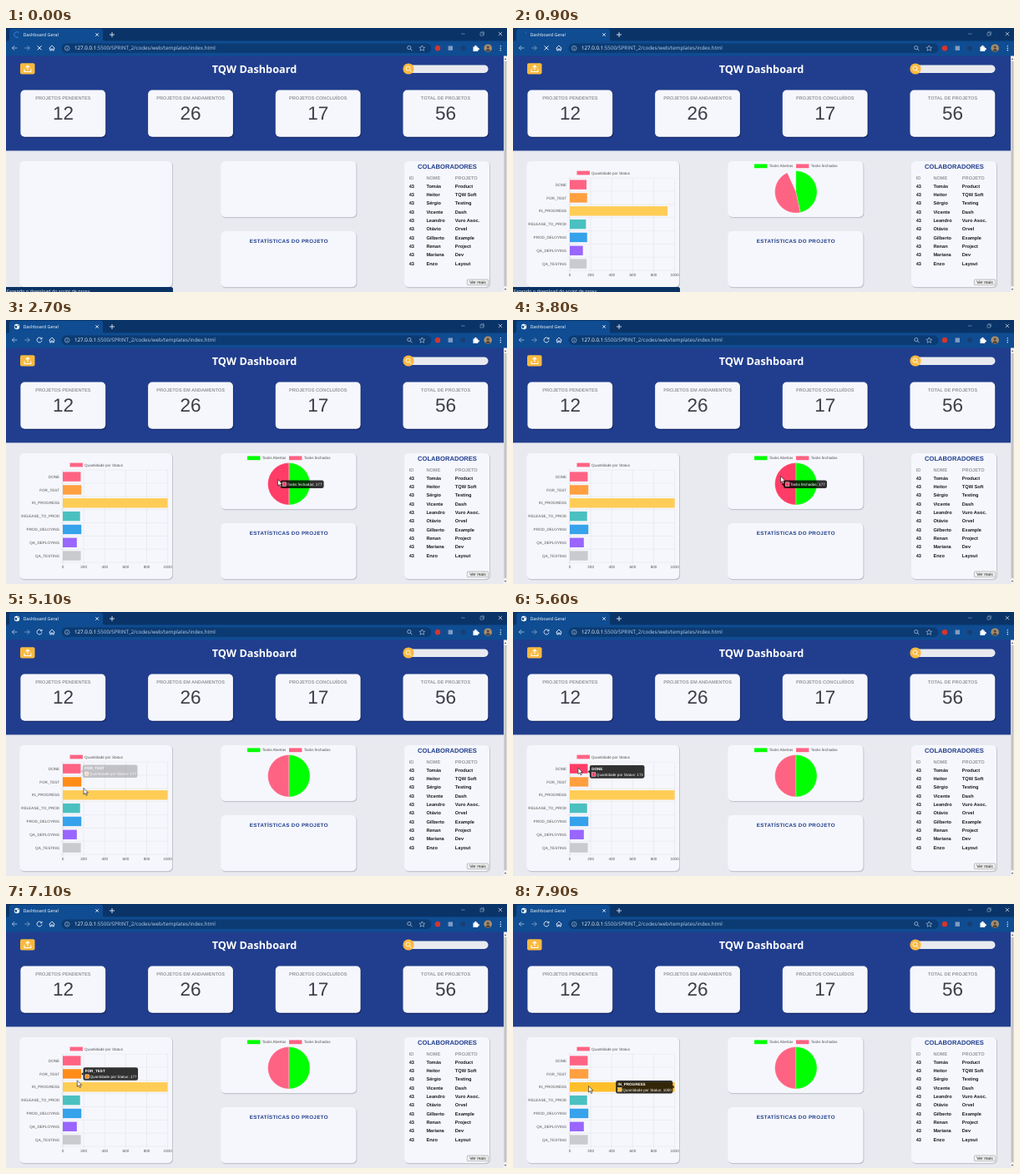
Recreate the animation shown at these times as an HTML page. Size 600 by 317 pixels, loop 8000 ms.

```html
<!DOCTYPE html>
<html lang="pt">
<head>
<meta charset="utf-8">
<title>Dashboard Geral</title>
<style>
html, body { margin: 0; width: 100%; height: 100%; overflow: hidden; background: #e9eaf0; }
svg { display: block; width: 100%; height: 100%; }
text { font-family: "Liberation Sans", Arial, sans-serif; text-rendering: geometricPrecision; white-space: pre; }
.ui { font-family: "Open Sans", sans-serif; }
.b { font-weight: bold; }
.m { text-anchor: middle; }
.e { text-anchor: end; }
</style>
</head>
<body>
<svg viewBox="0 0 600 317"><g id="page"></g><g id="charts"></g><g id="chrome"></g><g id="live"></g></svg>
<script>
const LOOP = 8000, CHART_START = 410, LOADED = 1400;
const TOOLBAR = '#0f4c92', NAVY = '#0a3263';
const $ = id => document.getElementById(id);

const text = (x, y, size, fill, str, cls = '', extra = '') =>
  `<text x="${x}" y="${y}" font-size="${size}" fill="${fill}" class="${cls}" ${extra}>${str}</text>`;
const rect = (x, y, w, h, fill, r = 0, extra = '') =>
  `<rect x="${x}" y="${y}" width="${w}" height="${h}" rx="${r}" fill="${fill}" ${extra}/>`;
const circle = (x, y, r, fill, extra = '') => `<circle cx="${x}" cy="${y}" r="${r}" fill="${fill}" ${extra}/>`;
const line = (d, stroke = '#fff', w = 0.8, extra = '') =>
  `<path d="${d}" fill="none" stroke="${stroke}" stroke-width="${w}" ${extra}/>`;
const card = (x, y, w, h, shade) =>
  rect(x + 0.6, y + 0.7, w + 0.4, h + 0.5, shade, 5) + rect(x, y, w, h, '#f6f7fc', 5);

// ---------- static page ----------
function page() {
  const blue = '#213e8e', grey = '#96979d', ink = '#1c1c1e';
  let s = rect(0, 33, 600, 284, '#e9eaf0') + rect(0, 33, 596, 114.4, blue);
  s += rect(17, 42.3, 17.5, 13.3, '#f9b940', 2);
  s += line('M22 49.5V52.5H29.8V49.5M25.9 50.5V45.3M23.6 47.4L25.9 45L28.2 47.4', '#fff', 1.1);
  s += text(297.5, 53.6, 12.7, '#fff', 'TQW Dashboard', 'ui b m');
  s += rect(476, 44.4, 101.5, 9.6, '#e9eaf0', 4.8) + circle(482, 49, 6.6, '#f9b940');
  s += circle(481.5, 48.5, 2.5, 'none', 'stroke="#fff" stroke-width=".9"') + line('M483.3 50.4L485.6 52.7', '#fff', 1);

  [['PENDENTES', 12], ['EM ANDAMENTOS', 26], ['CONCLUÍDOS', 17], [, 56]].forEach(([name, n], i) => {
    const x = 17.4 + i * 152.7;
    s += card(x, 74.6, 101.8, 56.2, '#14296a');
    s += text(x + 51, 86, 5.6, grey, name ? 'PROJETOS ' + name : 'TOTAL DE PROJETOS', 'b m');
    s += text(x + 51, 110, 22.5, '#3d3e46', n, 'm');
  });

  const shade = '#c3c4cc';
  s += card(16.4, 160, 182.6, 151, shade) + card(257.4, 160, 162, 67, shade);
  s += card(257.4, 244, 162, 67, shade) + card(477, 160, 102, 151, shade);
  s += text(338.8, 258, 6.2, blue, 'ESTATÍSTICAS DO PROJETO', 'b m', 'letter-spacing=".35"');

  s += text(528.5, 168.5, 7.6, blue, 'COLABORADORES', 'b m');
  const row = (y, fill, cells) => cells.forEach((c, i) => s += text([482.7, 503.4, 537.8][i], y, 5.65, fill, c, 'b'));
  row(181.7, grey, ['ID', 'NOME', 'PROJETO']);
  ['Tomás|Product', 'Heitor|TQW Soft', 'Sérgio|Testing', 'Vicente|Dash', 'Leandro|Vuro Asoc.', 'Otávio|Orvel',
   'Gilberto|Example', 'Renan|Project', 'Mariana|Dev', 'Enzo|Layout']
    .forEach((r, i) => row(191.6 + i * 10.36, ink, ['43', ...r.split('|')]));
  s += rect(552.3, 302, 25.4, 6.6, '#efefef', 1, 'stroke="#8a8a8a" stroke-width=".5"');
  s += text(565, 307, 5, '#111', 'Ver mais', 'm');

  s += rect(596, 33, 4, 284, '#f1f1f1') + rect(596.4, 40, 3.2, 270, '#c4c4c4');
  s += '<path d="M596.8 38l1.2-1.8 1.2 1.8zM596.8 313l1.2 1.8 1.2-1.8z" fill="#555"/>';
  return s;
}

// ---------- browser frame ----------
function chrome() {
  const pale = '#bcd0e8', dim = '#8fa9c8';
  let s = rect(0, 0, 600, 17, '#0a3468') + rect(0, 15.5, 600, 18, TOOLBAR);
  s += `<path d="M1 16Q4 16 4 13V4Q4 1 7 1H113Q116 1 116 4V13Q116 16 119 16Z" fill="${TOOLBAR}"/>`;
  s += text(20.4, 10, 5.4, '#fff', 'Dashboard Geral', 'ui');
  s += line('M107.3 6.2l3.6 3.6m0-3.6l-3.6 3.6M124 8h6m-3-3v6');
  s += line('M545 7h4.6M568 5.8h3.4v3.4h-3.4zM569 5.6V4.8H572.4V8.2H571.6', dim, 0.6);
  s += line('M589.8 4.8l4.4 4.4m0-4.4l-4.4 4.4', '#fff', 0.6);
  s += line('M13.3 24H7.3m2.8-2.8L7.3 24l2.8 2.8', pale);
  s += line('M22.3 24h6m-2.8-2.8L28.3 24l-2.8 2.8', dim);
  s += line('M51.6 24.4L55 21l3.4 3.4M52.7 23.6V27H54.2V25H55.8V27H57.3V23.6');
  s += rect(66.5, 18.5, 443, 11.6, '#0c3b73', 5.8);
  s += circle(73.2, 24.3, 2.8, 'none', `stroke="${pale}" stroke-width=".6"`) + line('M73.2 23.8v2.1m0-3.4v.7', pale, 0.7);
  s += text(82, 26.4, 6.2, '#fff',
    `127.0.0.1<tspan fill="${pale}">:5500/SPRINT_2/codes/web/templates/index.html</tspan>`, 'ui');
  s += circle(482.8, 23.6, 2.1, 'none', `stroke="${pale}" stroke-width=".7"`) + line('M484.4 25.2l2 2', pale);
  s += line('M498.3 20.9l1 2.2 2.4.2-1.8 1.6.6 2.4-2.2-1.3-2.2 1.3.6-2.4-1.8-1.6 2.4-.2z', pale, 0.6);
  s += circle(517, 24.2, 3.2, '#d9342b') + rect(529.6, 21.5, 5.4, 5.4, '#7f9cc0') + circle(547.2, 24.2, 2.8, '#1b3d6e');
  s += '<path d="M559.5 22.5h1.8a1.2 1.2 0 1 1 2.2 0h1.7v1.7a1.2 1.2 0 1 1 0 2.1v1.6h-5.7z" fill="#fff"/>';
  s += circle(577.2, 24.2, 4.8, '#a98c68') + circle(577.2, 23, 1.6, '#4e4a48')
    + '<path d="M574.1 27.4q3.1-4.6 6.2 0q-3.1 2.4-6.2 0z" fill="#4e4a48"/>';
  [21.6, 24.2, 26.8].forEach(y => s += circle(592.3, y, 0.7, '#fff'));
  return s;
}

// ---------- charts ----------
const PINK = '#ff6384', PINK_HOT = '#ff3d67';
const bars = [
  ['DONE', 171, PINK, PINK_HOT], ['FOR_TEST', 177, '#ff9f40', '#ff8c19'], ['IN_PROGRESS', 1000, '#ffcd56', '#ffbf2b'],
  ['RELEASE_TO_PROD', 165, '#4bc0c0'], ['PROD_DELOYING', 177, '#36a2eb'],
  ['QA_DEPLOYING', 134, '#9966ff'], ['QA_TESTING', 172, '#c9cbcf']
];
const slices = [['Tasks Abertas', 176, '#00ff00', '#00e000'], ['Tasks fechadas', 177, PINK, PINK_HOT]];
const X0 = 68, Y0 = 180.2, STEP = 15.83, SPAN = 125.6;
const PIE_X = 338.8, PIE_Y = 196.8, PIE_R = 25.2;
const rowY = i => Y0 + STEP * (i + 0.5);
const clamp = v => Math.min(1, Math.max(0, v));
const easeOut = v => 1 - (1 - clamp(v)) ** 4;
const mix = (a, b, v) => a + (b - a) * v;

function axes() {
  let s = rect(76.5, 171.6, 15.4, 4.8, PINK) + text(94, 175.6, 4.6, '#555', 'Quantidade por Status');
  for (let i = 0; i <= 5; i++) {
    const x = X0 + i * SPAN / 5;
    s += line(`M${x} ${Y0}v113`, i ? '#e0e1e6' : '#c9cad0', 0.5) + text(x, 298.2, 4.6, '#555', i * 200, 'm');
  }
  for (let i = 0; i <= 7; i++) s += line(`M${X0 - 3} ${Y0 + i * STEP}H${X0 + SPAN}`, '#e0e1e6', 0.5);
  bars.forEach((b, i) => s += text(64.2, rowY(i) + 1.6, 4.6, '#555', b[0], 'e'));
  slices.forEach((p, i) => s += rect(289 + i * 50, 163.4, 15.4, 4.8, p[2]) + text(306.8 + i * 50, 167.4, 4.6, '#555', p[0]));
  return s;
}

function sector(a, b, fill) {
  const p = t => `${PIE_X + PIE_R * Math.sin(t)} ${PIE_Y - PIE_R * Math.cos(t)}`;
  return `<path d="M${PIE_X} ${PIE_Y}L${p(a)}A${PIE_R} ${PIE_R} 0 ${b - a > Math.PI ? 1 : 0} 1 ${p(b)}Z"
    fill="${fill}" stroke="#fff" stroke-width=".25"/>`;
}

// Hover changes: [time, index], null when the pointer leaves
const barHover = [[4720, 0], [4900, null], [5080, 1], [5480, 0], [5800, null], [6080, 0], [6620, 1], [7180, 2]];
const pieHover = [[1850, 1], [2900, 0], [3650, 1], [3950, null]];
const hovered = (events, t) => (events.filter(e => e[0] <= t).pop() || [0, null])[1];

function barTip(i) {
  const [title, n, col, hot] = bars[i], right = i === 2, w = right ? 68 : 65.6;
  return { x: right ? X0 + SPAN - 2.4 - w : X0 + SPAN * n / 1000 + 2.2, y: rowY(i), w, h: 15.6, right, title,
           body: 'Quantidade por Status: ' + n, col: hot || col };
}
function pieTip(i) {
  const [name, n, , hot] = slices[i];
  return { x: i ? 328.6 : 298, y: 197.2, w: i ? 52 : 51, h: 9.6, right: !i, body: `${name}: ${n}`, col: hot };
}

// Each change eases position and opacity from wherever the tooltip then is
function tooltip(events, make, t) {
  let from, to, start;
  const at = time => {
    const v = easeOut((time - start) / 400);
    return { x: mix(from.x, to.x, v), y: mix(from.y, to.y, v), o: mix(from.o, to.o, v) };
  };
  for (const [time, i] of events) {
    if (time > t) break;
    const next = i === null ? { ...to, o: 0 } : { ...make(i), o: 1 };
    from = to ? at(time) : { ...next, o: 0 };
    to = next;
    start = time;
  }
  if (!to) return '';
  const { x, y, o } = at(t), top = y - to.h / 2, base = to.title ? top + 12.6 : top + 6.4;
  if (o < 0.01) return '';
  const edge = to.right ? x + to.w : x, tip = to.right ? 2.3 : -2.3;
  return `<g opacity="${o}">` + rect(x, top, to.w, to.h, 'rgba(0,0,0,.8)', 2.3)
    + `<path d="M${edge} ${y - 2}l${tip} 2l${-tip} 2z" fill="rgba(0,0,0,.8)"/>`
    + (to.title ? text(x + 2.3, top + 6.1, 4.6, '#fff', to.title, 'b') : '')
    + rect(x + 2.5, base - 3.9, 4.4, 4.4, to.col, 0, 'stroke="#fff" stroke-width=".5"')
    + text(x + 8, base, 4.6, '#fff', to.body) + '</g>';
}

function charts(t) {
  if (t < CHART_START) return '';
  const v = easeOut((t - CHART_START) / 1000), hotBar = hovered(barHover, t), hotPie = hovered(pieHover, t);
  let s = axes();
  bars.forEach(([, n, col, hot], i) =>
    s += rect(X0, rowY(i) - 5.7, SPAN * n / 1000 * v, 11.4, i === hotBar ? hot : col));
  slices.forEach(([, , col, hot], i) =>
    s += sector(Math.PI * i * v, Math.PI * (i + 1) * v, i === hotPie ? hot : col));
  return s + tooltip(barHover, barTip, t) + tooltip(pieHover, pieTip, t);
}

// ---------- loading marks and pointer ----------
function loading(t) {
  if (t >= LOADED)
    return circle(13, 8, 3.2, '#fff')
      + `<path d="M10.6 6.6l2.2.4.6 1.2-1.3 2.2-1.6-2zM13.6 5.2l1.8 1.2-1.2 1z" fill="${TOOLBAR}"/>`
      + line('M42.6 22.4A3 3 0 1 0 43 24.6M43 20.8V22.8H41');
  const turn = t / 1333 * 360 + 60, len = 8 + 6.5 * Math.cos(Math.PI * t / 900);
  return circle(13, 8, 3.3, 'none', `stroke="#3f8ee8" stroke-width=".8" stroke-dasharray="${len} 30" transform="rotate(${turn} 13 8)"`)
    + line('M37.6 21.4l5 5m0-5l-5 5', '#fff', 0.9)
    + `<path d="M0 311H197.5Q200 311 200 313.5V317H0Z" fill="${NAVY}"/>`
    + text(1, 318.4, 5.45, '#fff', 'Fazendo o download do script de proxy...', 'ui');
}

const path = [
  [1300, 250, 318], [1900, 322, 196], [2700, 325.5, 191.5], [3200, 350, 196], [3550, 348, 192], [3800, 320.5, 187.5],
  [4000, 308, 186], [4650, 95, 190], [4800, 84, 189], [5000, 90, 206], [5100, 93, 211.5], [5400, 85, 203],
  [5600, 78, 187], [5850, 79, 180], [6150, 77, 188], [6400, 77, 188], [6800, 80, 205], [7400, 90.5, 218.5], [8000, 90.5, 218.5]
];
function pointer(t) {
  const k = path.findIndex(p => p[0] > t);
  if (k < 1) return '';
  const [a, b] = [path[k - 1], path[k]], u = (t - a[0]) / (b[0] - a[0]), v = u * u * (3 - 2 * u);
  return `<path transform="translate(${mix(a[1], b[1], v)} ${mix(a[2], b[2], v)})"
    d="M0 0V7.6L1.8 6L3 8.8L4.3 8.2L3.1 5.5H5.4Z" fill="#fff" stroke="#111" stroke-width=".6"/>`;
}

$('page').innerHTML = page();
$('chrome').innerHTML = chrome();
function draw() {
  const t = performance.now() % LOOP;
  $('charts').innerHTML = charts(t);
  $('live').innerHTML = loading(t) + pointer(t);
  requestAnimationFrame(draw);
}
draw();
</script>
</body>
</html>
```
